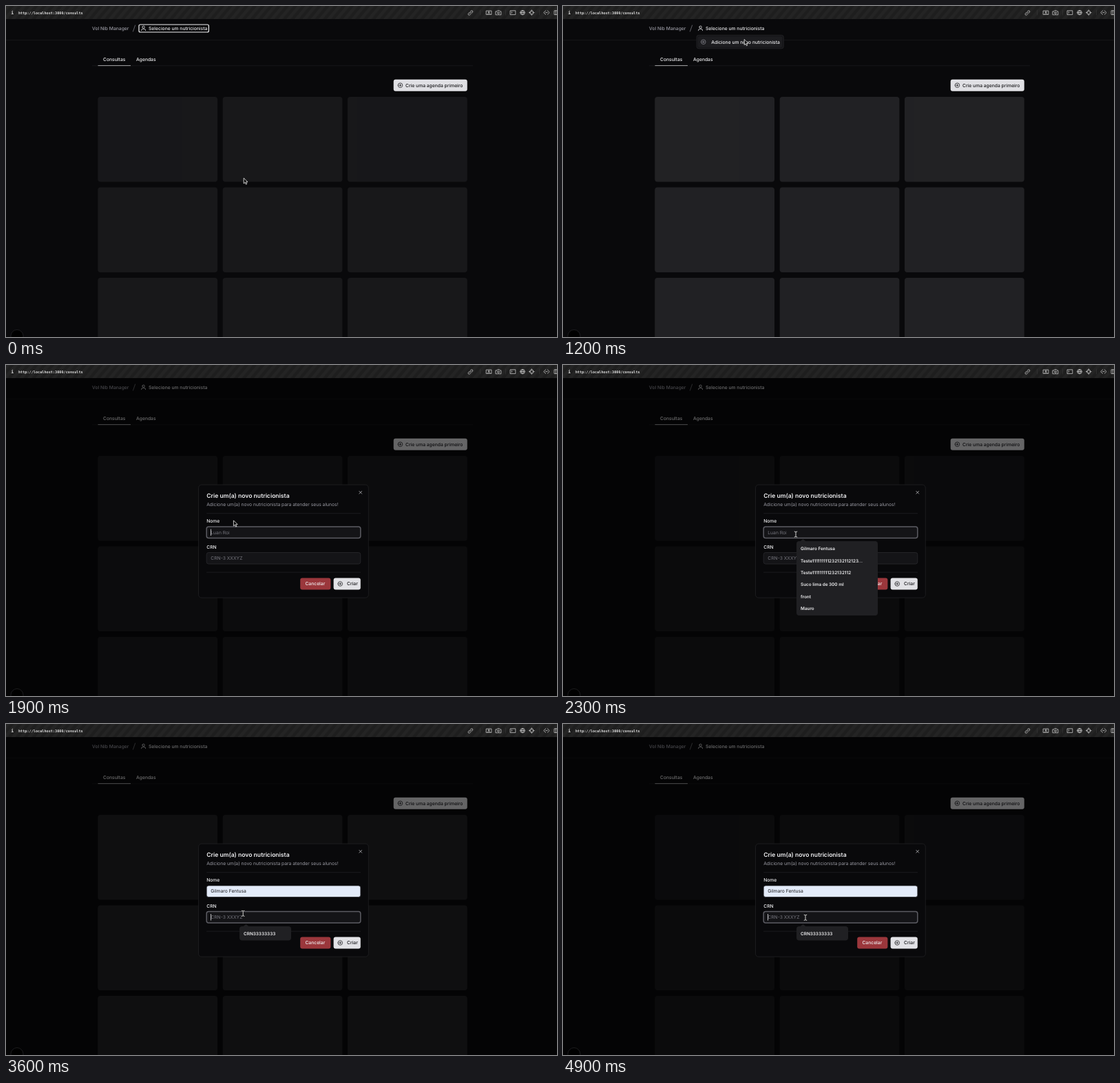
Animation, 800 px wide and 481 px high, one loop 5000 ms. Source, as an HTML page:

```html
<!DOCTYPE html>
<html lang="pt">
<head>
<meta charset="utf-8">
<title>Consultas</title>
<style>
  html, body { margin: 0; width: 100%; height: 100%; overflow: hidden; background: #09090b; }
  svg { display: block; width: 100%; height: 100%; }
  text { font: 500 6.75px Inter, "Open Sans", sans-serif; fill: #f0f0f2; white-space: pre; text-rendering: geometricPrecision; }
  .muted { fill: #9b9ba4; }
  .dark { fill: #18181b; }
  .hint { font-weight: 400; fill: #77777f; }
  .title { font-size: 8.6px; font-weight: 600; }
  .item { font-size: 6.4px; font-weight: 600; }
  .mono { font: 700 5.2px "DejaVu Sans Mono", "Noto Sans Mono", monospace; fill: #dedede; }
  .icon { fill: none; stroke: currentColor; stroke-linecap: round; stroke-linejoin: round; }
</style>
</head>
<body>
<svg id="stage" viewBox="0 0 800 481" xmlns="http://www.w3.org/2000/svg"></svg>
<script>
const LOOP = 5000, STEP = 100;
const stage = document.getElementById('stage');
const NAME = 'Gilmaro Fentusa';

const rect = (x, y, w, h, r, fill, more = '') =>
  `<rect x="${x}" y="${y}" width="${w}" height="${h}" rx="${r}" fill="${fill}" ${more}/>`;
const text = (x, y, s, cls = '', more = '') => `<text x="${x}" y="${y}" class="${cls}" ${more}>${s}</text>`;
const path = (d, color, width = 0.8) =>
  `<path class="icon" d="${d}" stroke-width="${width}" style="color:${color}"/>`;
const line = (x1, y, x2, color) => `<path d="M${x1} ${y}H${x2}" stroke="${color}" stroke-width=".8"/>`;
const group = (id, body) => `<g id="${id}">${body}</g>`;
const circle = (x, y, r) => `M${x - r} ${y}a${r} ${r} 0 1 0 ${2 * r} 0a${r} ${r} 0 1 0 ${-2 * r} 0`;
const plus = (x, y, color) =>
  path(`${circle(x, y, 3.3)}M${x - 1.5} ${y}h3M${x} ${y - 1.5}v3`, color, 0.75);
const cross = (x, y, s, color) =>
  path(`M${x - s} ${y - s}l${2 * s} ${2 * s}M${x + s} ${y - s}l${-2 * s} ${2 * s}`, color, 0.75);

function browserBar() {
  const icons = [
    'M673.3 10.7l2-2M672.9 9.3l-1.6 1.6a1.5 1.5 0 0 0 2.1 2.1l1.3-1.3M674 8.2l1.3-1.3a1.5 1.5 0 0 1 2.1 2.1l-1.6 1.6',
    'M697.5 7h7.4v5.4h-7.4zM699.5 11.2q1.7-1.5 3.4 0' + circle(701.2, 8.9, 0.9),
    'M711.3 7.8h1.8l.8-1.2h2.4l.8 1.2h1.7v5h-7.5z' + circle(715.1, 10.1, 1.4),
    'M732.4 6.8h7.4v5.8h-7.4zM733.8 8.4l1.2 1l-1.2 1',
    circle(750, 9.6, 3.3) + 'M746.7 9.6h6.6M750 6.3q-3 3.3 0 6.6q3-3.3 0-6.6',
    circle(763.2, 9.6, 2.7) + 'M763.2 5.7v2.4M763.2 11.1v2.4M759.3 9.6h2.4M764.7 9.6h2.4',
    'M783.6 6.8l-2.9 2.8l2.9 2.8M786.2 6.8l2.9 2.8l-2.9 2.8M783.6 9.6h2.6',
    'M800 6.8h-4v5.8h4M798.4 6.8v5.8'
  ];
  return rect(0, 0, 800, 19, 0, 'url(#stripes)') +
    text(7.2, 12, 'i', 'mono', 'style="font-size:6.5px"') +
    text(18, 11.6, 'http://localhost:3000/consults', 'mono') +
    path('M688.5 6v7M725.5 6v7M774.5 6v7', '#3a3a3a', 0.6) +
    path(icons.join(''), '#d2d2d2', 0.75);
}

function page() {
  let cards = '';
  for (const y of [132, 263.5, 395])
    for (const x of [133.3, 314.7, 496]) cards += rect(x, y, 173.7, 123.5, 4, '#27272a');
  return rect(0, 19, 800, 462, 0, '#09090b') +
    line(0, 49.6, 800, '#1a1a1d') +
    text(125, 34.9, 'Vol Nib Manager', 'muted') +
    path('M184.4 37l3.2-9', '#77777e') +
    path(circle(199.6, 30.7, 1.7) + 'M196.7 35.7v-.5a1.8 1.8 0 0 1 1.8-1.8h2.2a1.8 1.8 0 0 1 1.8 1.8v.5', '#e8e8ea') +
    text(207, 34.9, 'Selecione um nutricionista') +
    rect(193, 27, 101.4, 11, 2, 'none', 'id="triggerRing" stroke="#f2f2f4" stroke-width="1.2"') +
    line(125, 86.8, 678, '#1a1a1d') +
    line(133.5, 86.6, 181, '#c8c8cc') +
    text(141, 80.3, 'Consultas') + text(189, 80.3, 'Agendas') +
    rect(562.7, 106.8, 107, 17, 3, '#e0e0e4') +
    plus(572.4, 115.2, '#18181b') + text(580, 117.5, 'Crie uma agenda primeiro', 'dark') +
    group('cards', cards) +
    group('menu', rect(194, 42.3, 126.3, 19.6, 3, '#151518', 'stroke="#27272a" stroke-width=".7"') +
      rect(196, 44.3, 122.3, 15.6, 2, '#1c1c1f') +
      plus(203.8, 52.2, '#8b8b93') + text(215.3, 54.6, 'Adicione um novo nutricionista'));
}

const field = (id, y) =>
  rect(291.2, y, 223.6, 16.6, 3, '#141417', `id="${id}" stroke="#2a2a2e" stroke-width=".8"`);

function dialog() {
  return rect(279.5, 174, 246.8, 164.2, 4.5, '#09090b', 'stroke="#242428" stroke-width=".7"') +
    text(291.2, 192.6, 'Crie um(a) novo nutricionista', 'title') +
    text(291.2, 205.3, 'Adicione um(a) novo nutricionista para atender seus alunos!', 'muted', 'style="font-weight:400"') +
    cross(514.7, 185.2, 1.9, '#c4c4c8') +
    line(291.2, 215.7, 515, '#202024') +
    text(291.2, 229.4, 'Nome') + field('nameBox', 234.9) +
    text(297.3, 245.8, 'Luan Roi', 'hint', 'id="nameHint"') +
    text(297.3, 245.4, NAME, 'dark', 'id="nameValue" style="font-weight:400"') +
    text(291.2, 267.2, 'CRN') + field('crnBox', 272.5) +
    text(297.3, 283.4, 'CRN-3 XXXYZ', 'hint') +
    rect(297.1, 238.5, 0.8, 9.5, 0, '#e4e4e7', 'id="nameCaret"') +
    rect(297.1, 276, 0.8, 9.5, 0, '#e4e4e7', 'id="crnCaret"') +
    line(291.2, 301.2, 515, '#202024') +
    rect(427.2, 309.5, 44.2, 17, 3, '#9b373c') + text(434.4, 320.4, 'Cancelar') +
    rect(475.6, 309.5, 39.2, 17, 3, '#e2e2e6') +
    plus(485.2, 318, '#18181b') + text(495, 320.4, 'Criar', 'dark');
}

function popup(y, w, h, items, hover = '') {
  return `<path d="M344 ${y + .5}l4.5-3.5l4.5 3.5z" fill="#202023"/>` +
    rect(339, y, w, h, 4, '#202023') + hover +
    items.map((s, i) => text(345, y + 13.1 + i * 17.4, s, 'item')).join('');
}

stage.innerHTML = `<defs><pattern id="stripes" width="9" height="9" patternUnits="userSpaceOnUse" patternTransform="rotate(40)">
  ${rect(0, 0, 9, 9, 0, '#1e1e1e')}${rect(0, 0, 4.5, 9, 0, '#242424')}</pattern></defs>` +
  page() +
  rect(0, 19, 800, 462, 0, '#000', 'id="shade"') +
  group('dialog', dialog()) +
  group('nameList', popup(256, 118, 108, [
    NAME, 'Teste111111111232132112123...', 'Teste111111111232132112',
    'Suco lima de 300 ml', 'front', 'Mauro'
  ], group('hover', rect(340, 258.2, 116, 16.8, 2.5, '#333337') + cross(446.4, 266.7, 1.9, '#d8d8dc')))) +
  group('crnList', popup(294, 75, 20.6, ['CRN33333333'])) +
  '<circle cx="16" cy="479.5" r="9" fill="#000" stroke="#29292b" stroke-width=".7"/>' +
  browserBar() +
  group('arrow', '<path d="M0 0V8l1.9-1.7L3.2 9.2l1.3-.6L3.2 5.8H5.8Z" fill="#050505" stroke="#f4f4f4" stroke-width=".8" stroke-linejoin="round"/>') +
  group('beam', ['#111;stroke-width:1.9', '#eee;stroke-width:.9'].map(s =>
    `<path d="M-2.2-4Q0-4 0-3Q0-4 2.2-4M0-3V3M-2.2 4Q0 4 0 3Q0 4 2.2 4" fill="none" style="stroke:${s}"/>`).join(''));

const ui = {};
stage.querySelectorAll('[id]').forEach(n => ui[n.id] = n);

// time, x, y
const route = [
  [0, 345.2, 250], [600, 263.5, 32.5], [800, 263.5, 32.5], [1200, 263.2, 48.5],
  [1400, 263.2, 48.5], [1500, 264.7, 52.5], [2000, 338, 246], [2800, 338, 246],
  [3100, 354, 264], [3300, 354, 264], [3600, 344.2, 275.3], [4000, 352, 281.3], [LOOP, 352, 281.3]
];

const clamp = v => Math.min(1, Math.max(0, v));
const smooth = v => v * v * (3 - 2 * v);
const ramp = (t, from, to) => clamp((t - from) / (to - from));
const within = (t, a, b) => t >= a && t < b;
const set = (node, attrs) => { for (const k in attrs) node.setAttribute(k, attrs[k]); };
const fade = (node, v) => set(node, { opacity: v, visibility: v > 0 ? 'visible' : 'hidden' });
const zoom = (node, x, y, s) =>
  set(node, { transform: `translate(${x} ${y}) scale(${s}) translate(${-x} ${-y})` });

function pointer(t) {
  const i = route.findIndex(p => p[0] > t);
  const [t0, x0, y0] = route[i - 1], [t1, x1, y1] = route[i];
  const k = smooth((t - t0) / (t1 - t0));
  return `translate(${x0 + (x1 - x0) * k} ${y0 + (y1 - y0) * k})`;
}

const outline = focused => focused
  ? { stroke: '#5c5c63', 'stroke-width': 1.5 }
  : { stroke: '#2a2a2e', 'stroke-width': 0.8 };

function draw(t) {
  fade(ui.cards, 0.5 + 0.33 * (0.5 - 0.5 * Math.cos(t / 2400 * 2 * Math.PI)));
  fade(ui.triggerRing, +(t < 700));

  const menu = t < 1500 ? ramp(t, 600, 900) : 0.14 * (t < 1600);
  fade(ui.menu, menu);
  zoom(ui.menu, 257 + 7 * (t >= 1500), 52, 0.95 + 0.05 * menu);

  const open = t < 1500 ? 0 : t < 1600 ? 0.78 : 1;
  fade(ui.shade, 0.55 * open);
  fade(ui.dialog, open);
  zoom(ui.dialog, 403, 256, 0.95 + 0.05 * open);

  const filled = t >= 3000, chosen = t >= 3400;
  set(ui.nameBox, { fill: filled ? '#e3ebf9' : '#141417', ...outline(t < 3500) });
  set(ui.crnBox, outline(t >= 3500));
  fade(ui.nameHint, +!filled);
  fade(ui.nameValue, +filled);
  ui.nameValue.style.fontSize = chosen ? '6.75px' : '6.1px';
  fade(ui.nameCaret, +(within(t, 1500, 2000) || within(t, 2500, 3000)));
  fade(ui.crnCaret, +(within(t, 3500, 4100) || t >= 4600));

  fade(ui.nameList, t < 3400 ? ramp(t, 2000, 2200) : 0.35 * (t < 3500));
  fade(ui.hover, +filled);
  fade(ui.crnList, ramp(t, 3400, 3600));

  const typing = within(t, 2000, 2900) || t >= 3500;
  const at = pointer(t);
  set(ui.arrow, { transform: at, visibility: typing ? 'hidden' : 'visible' });
  set(ui.beam, { transform: at, visibility: typing ? 'visible' : 'hidden' });
}

const start = performance.now();
function tick() {
  const t = (performance.now() - start) % LOOP;
  draw(Math.floor(t / STEP) * STEP);
  requestAnimationFrame(tick);
}
tick();
</script>
</body>
</html>
```
